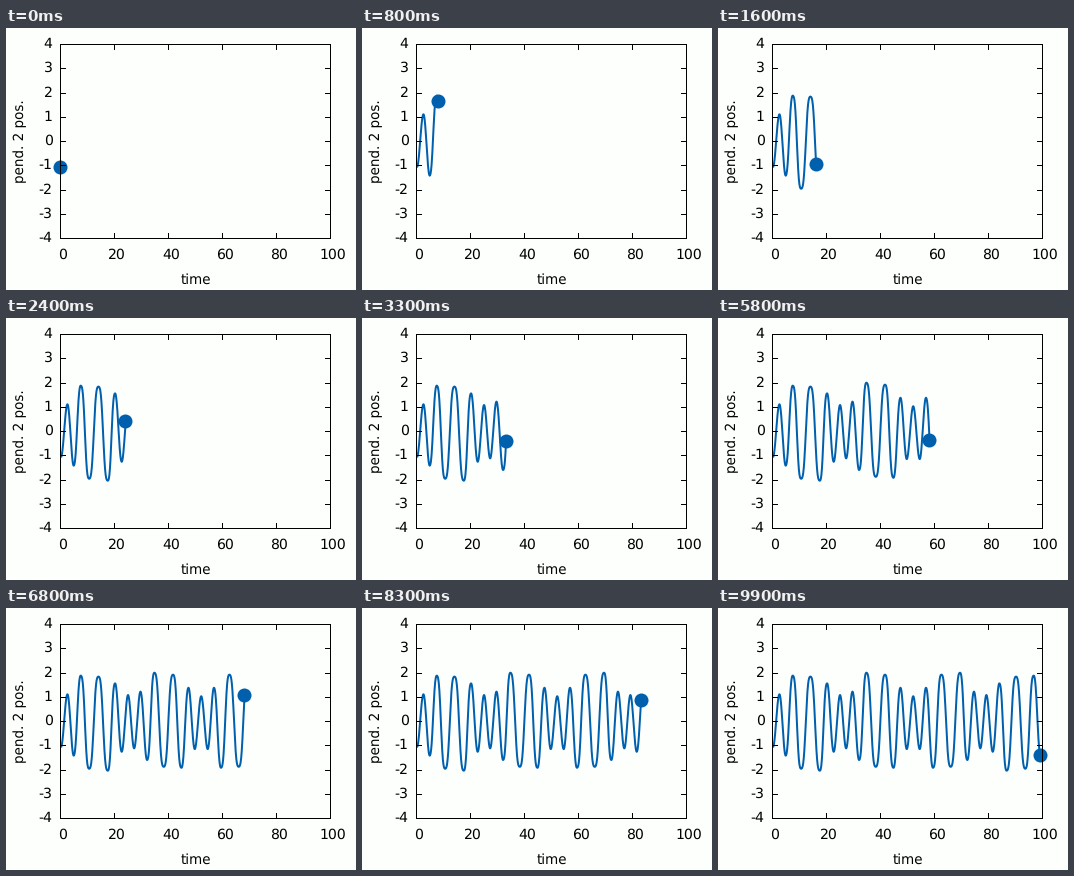
These frames come from a looping animation (350 px wide and 262 px high, 10 s). A matplotlib script:

```python
import numpy as np
import matplotlib.pyplot as plt
from matplotlib.animation import FuncAnimation
from matplotlib.patches import Circle

W, H, DPI = 350, 262, 72
LEFT, RIGHT, TOP, BOTTOM = 54.95, 324.95, 16.7, 210.7
BLUE = "#0060ad"
FRAMES = 100
TICK = 5

plt.rcParams["font.family"] = "DejaVu Sans"
plt.rcParams["font.size"] = 13.5
plt.rcParams["text.hinting"] = "none"

# Turning points of the swing over one quarter of its cycle.
HALF = 51.95
TURN_T = np.array([0, 2.4, 4.72, 7.3, 10.45, 13.86, 17.37, 20.05, 22.5,
                   24.85, HALF - 24.85])
TURN_V = np.array([-1.05, 1.13, -1.4, 1.9, -1.94, 1.86, -2.02, 1.58, -1.24,
                   1.1, -1.1])


def swing(t):
    """Pendulum angle; it flips sign every HALF and about each HALF / 2."""
    n, s = np.divmod(np.asarray(t, float), HALF)
    sign = np.where(n % 2 == 0, 1, -1)
    late = s > HALF / 2
    sign = np.where(late, -sign, sign)
    s = np.where(late, HALF - s, s)
    k = np.clip(np.searchsorted(TURN_T, s, side="right") - 1, 0,
                len(TURN_T) - 2)
    a, b = TURN_V[k], TURN_V[k + 1]
    phase = np.pi * (s - TURN_T[k]) / (TURN_T[k + 1] - TURN_T[k])
    # Wide swings linger at the turning points.
    c = 0.1 * np.clip(np.abs(a - b) / 2 - 1, 0, 1) ** 2
    shape = (np.cos(phase) - c * np.cos(3 * phase)) / (1 - c)
    return sign * ((a + b) / 2 + (a - b) / 2 * shape)


def px(t):
    return LEFT + (RIGHT - LEFT) * t / 100


def py(v):
    return BOTTOM - (BOTTOM - TOP) * (v + 4) / 8


def snap(p):
    """Centre of the pixel that holds p."""
    return np.floor(p) + 0.5


fig = plt.figure(figsize=(W / DPI, H / DPI), dpi=DPI, facecolor="#fdfffd")
ax = fig.add_axes([0, 0, 1, 1])
ax.set_xlim(0, W)
ax.set_ylim(H, 0)
ax.axis("off")


def rule(xs, ys):
    ax.plot(xs, ys, color="black", lw=1, snap=False, zorder=5,
            solid_capstyle="projecting", solid_joinstyle="miter")


x0, x1, y0, y1 = snap(np.array([LEFT, RIGHT, TOP, BOTTOM]))
rule([x0, x1, x1, x0, x0], [y0, y0, y1, y1, y0])
for t in range(0, 101, 20):
    x = snap(px(t))
    rule([x, x], [y1, y1 - TICK])
    rule([x, x], [y0, y0 + TICK])
    ax.text(x + 2.4, 231, str(t), ha="center", va="baseline", size=14)
for v in range(-4, 5):
    y = snap(py(v))
    rule([x0, x0 + TICK], [y, y])
    rule([x1, x1 - TICK], [y, y])
    ax.text(46.5, y + 3.5, str(v), ha="right", va="baseline", size=14)
ax.text(190, 256, "time", ha="center", va="baseline")
ax.text(18, 113, "pend. 2 pos.", rotation=90, ha="center", va="baseline",
        rotation_mode="anchor")

trail, = ax.plot([], [], color=BLUE, lw=2, zorder=3,
                 solid_joinstyle="round", solid_capstyle="butt")
bob = ax.add_patch(Circle((0, 0), 7, color=BLUE, lw=0, zorder=4))


def draw(i):
    t = np.linspace(0, i, 20 * i + 1)
    trail.set_data(px(t), py(swing(t)))
    bob.center = snap(px(i)), snap(py(swing(i)))
    return trail, bob


anim = FuncAnimation(fig, draw, frames=FRAMES, interval=100, repeat=True,
                     repeat_delay=0, init_func=lambda: draw(0))
plt.show()
```
